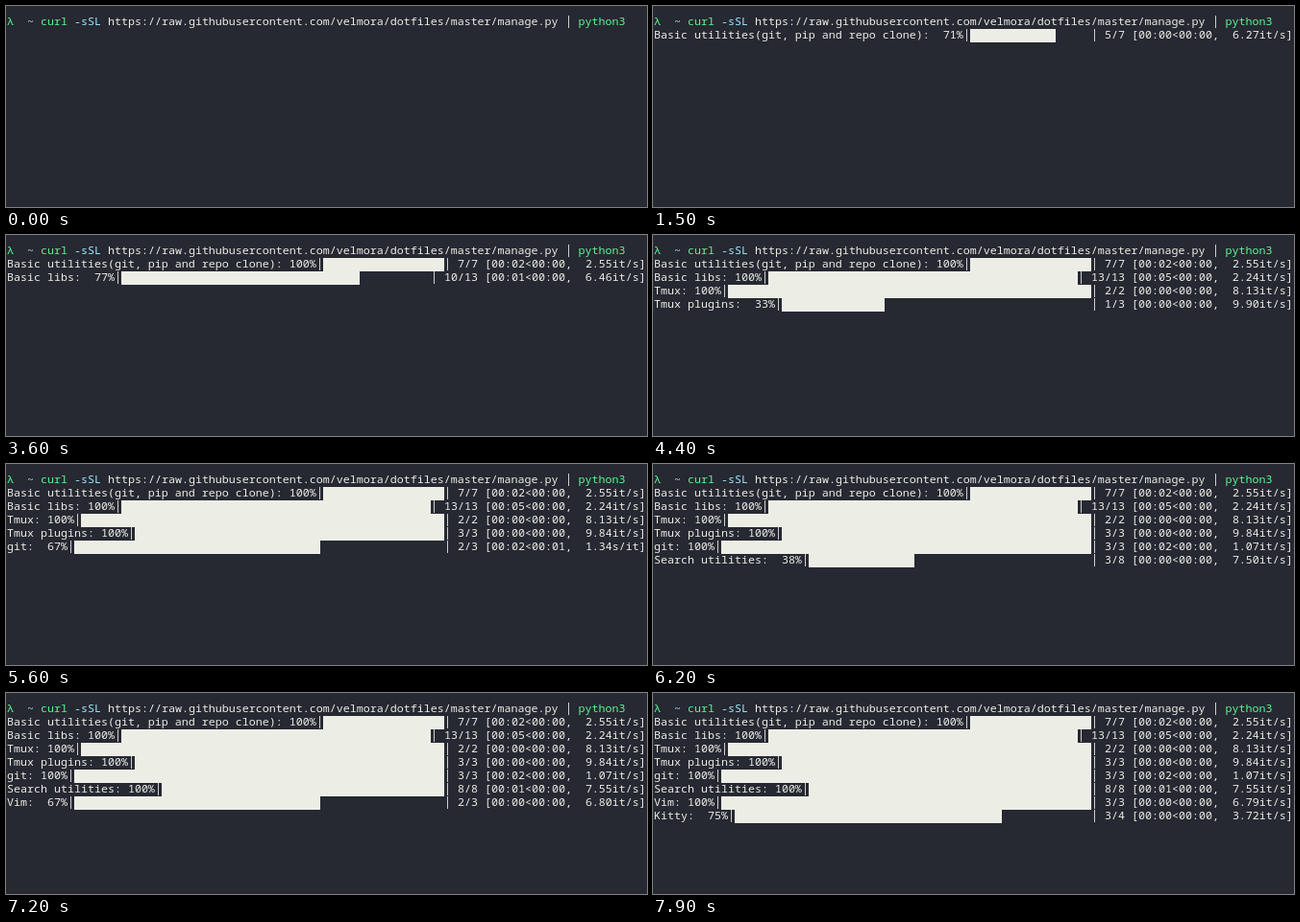
An HTML page that plays this animation: 667x210 px, repeating every 8000 ms.

```html
<!DOCTYPE html>
<html lang="en">
<head>
<meta charset="utf-8">
<title>Dotfiles install</title>
<style>
  html, body {
    margin: 0;
    width: 100%;
    height: 100%;
    overflow: hidden;
    background: #262832;
  }
  #term {
    position: absolute;
    inset: 0;
    overflow: hidden;
    color: #eceee6;
    font: 11.6667px/11px "Noto Sans Mono", "DejaVu Sans Mono", monospace;
    white-space: pre;
  }
  #term > * { position: absolute; }
  .block { height: 14px; background: #eceee6; }
  .cmd { color: #5af78e; }
  .opt { color: #9aedfe; }
  .pipe { display: inline-block; transform: scaleY(1.15); transform-origin: bottom; }
</style>
</head>
<body>
<div id="term"></div>
<script>
const LOOP = 8000, TICK = 100, FIRST = 700;
const COLS = 95, CELL_W = 7, CELL_H = 14, LEFT = 1, TOP = 10;

// gap: ms per item, pace: items/s while running, rate: items/s when done.
// Each job starts when the one before it ends.
const jobs = [
  { name: "Basic utilities(git, pip and repo clone)", total: 7, gap: 160, end: 1900, pace: 6.27, rate: 2.55 },
  { name: "Basic libs", total: 13, gap: 160, end: 4100, pace: 6.46, rate: 2.24 },
  { name: "Tmux", total: 2, gap: 120, end: 4300, pace: 8.13, rate: 8.13 },
  { name: "Tmux plugins", total: 3, gap: 100, end: 4600, pace: 9.9, rate: 9.84 },
  { name: "git", total: 3, gap: 500, end: 5700, pace: 1 / 1.34, rate: 1.07 },
  { name: "Search utilities", total: 8, gap: 140, end: 6900, pace: 7.5, rate: 7.55 },
  { name: "Vim", total: 3, gap: 140, end: 7300, pace: 6.8, rate: 6.79 },
  { name: "Kitty", total: 4, gap: 200, end: LOOP, pace: 3.72, rate: 3.72 },
];

const prompt = [
  ["λ", "cmd"], ["  "], ["~", "opt"], [" "], ["curl", "cmd"], [" "],
  ["-sSL", "opt"],
  [" https://raw.githubusercontent.com/velmora/dotfiles/master/manage.py "],
  ["|", "pipe"], [" "], ["python3", "cmd"],
];

const term = document.getElementById("term");

function place(row, col) {
  const el = document.createElement("div");
  el.style.left = LEFT + col * CELL_W + "px";
  el.style.top = TOP + row * CELL_H + "px";
  term.append(el);
  return el;
}

function write(row, col, parts) {
  const line = place(row, col);
  for (const [text, style] of parts) {
    const span = document.createElement("span");
    span.textContent = text;
    if (style) span.className = style;
    line.append(span);
  }
}

function block(row, col, width) {
  const el = place(row, col);
  el.className = "block";
  el.style.width = width + "px";
}

function clock(sec) {
  const two = v => String(Math.floor(v)).padStart(2, "0");
  return two(sec / 60) + ":" + two(sec % 60);
}

function stats(n, total, rate) {
  if (!n) return ` 0/${total} [00:00<?, ?it/s]`;
  const speed = rate < 1 ? (1 / rate).toFixed(2) + "s/it" : rate.toFixed(2) + "it/s";
  return ` ${n}/${total} [${clock(n / rate)}<${clock((total - n) / rate)},  ${speed}]`;
}

function drawJob(row, { name, total, gap, end, pace, rate }, start, t) {
  const done = t >= end;
  const n = done ? total : Math.min(total - 1, Math.floor((t - start + TICK / 2) / gap));
  const head = `${name}: ${String(Math.round(100 * n / total)).padStart(3)}%`;
  const tail = stats(n, total, done ? rate : pace);
  const left = head.length + 1;
  const right = COLS - tail.length - 1;
  const eighths = Math.floor(n / total * (right - left) * 8);
  write(row, 0, [[head], ["|", "pipe"]]);
  block(row, left, Math.round(eighths * CELL_W / 8));
  write(row, right, [["|", "pipe"], [tail]]);
}

function draw(t) {
  term.replaceChildren();
  write(0, 0, prompt);
  if (t >= 200 && t < 300) block(0, 92, CELL_W);
  if (t >= 300 && t < FIRST) block(1, 0, CELL_W);
  jobs.forEach((job, i) => {
    const start = i ? jobs[i - 1].end : FIRST;
    if (t >= start) drawJob(i + 1, job, start, t);
  });
}

let shown = -1;
const began = performance.now();

function tick(now) {
  const step = Math.floor(Math.max(0, now - began) % LOOP / TICK);
  if (step !== shown) draw((shown = step) * TICK);
  requestAnimationFrame(tick);
}

tick(began);
</script>
</body>
</html>
```
